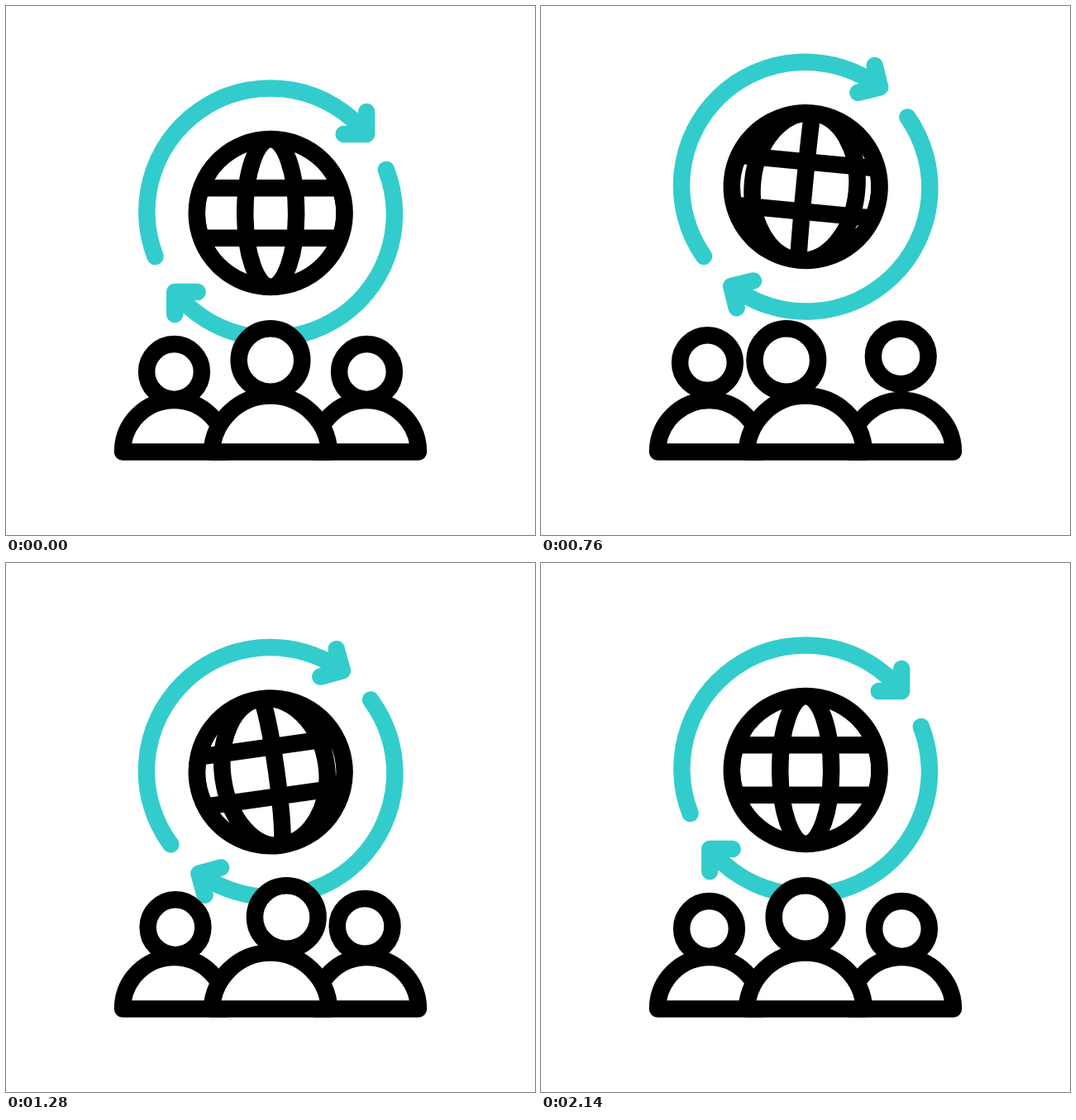
These frames come from a looping animation (640x640 px, 2.4 s). An HTML page:

```html
<!DOCTYPE html>
<html lang="en">
<head>
<meta charset="utf-8">
<title>Global community</title>
<style>
  html, body { margin: 0; width: 100%; height: 100%; overflow: hidden; background: #fff; }
  svg { display: block; width: 100vw; height: 100vh; }
  .line { fill: none; stroke: #000; stroke-width: 20.5; stroke-linecap: round; stroke-linejoin: round; }
  .teal { stroke: #33cccc; }
  .solid { fill: #fff; }
  .flat { stroke-linecap: butt; }
</style>
</head>
<body>
<svg viewBox="0 0 640 640">
  <defs>
    <clipPath id="disc"><circle r="95"/></clipPath>
    <path id="arrow" d="M-139.7 52.5A149.5 149.5 0 0 1 116 -95.5M116 -122.5V-95.5H88.5"/>
  </defs>
  <g id="world">
    <g id="ring" class="line teal">
      <use href="#arrow"/>
      <use href="#arrow" transform="rotate(180)"/>
    </g>
    <g id="globe" class="line">
      <g clip-path="url(#disc)" class="flat">
        <path d="M-90 -30.2H90M-90 30.2H90"/>
        <path id="meridians"/>
      </g>
      <circle r="89.4"/>
    </g>
  </g>
  <g class="line solid">
    <circle id="left" cx="203.5" cy="442.5" r="33.4"/>
    <path d="M141 539.5a62.5 62.5 0 0 1 125 0z"/>
    <circle id="right" cx="436.5" cy="442.5" r="33.4"/>
    <path d="M374 539.5a62.5 62.5 0 0 1 125 0z"/>
    <circle id="middle" cx="320" cy="428.5" r="38.3"/>
    <path d="M248.8 539.5a71.3 71.7 0 0 1 142.4 0z"/>
  </g>
</svg>
<script>
const LOOP = 2400, STEP = 20, LAST = 107, RADIUS = 89.4;

// Each track lists [step, value, ...]; moves between keys ease in and out.
const tracks = {
  height: [[0, 0], [18, 48.6], [36, -35], [53, 47], [73, -30.5], [92, 18], [107, 0]],
  swing: [[0, 0], [23, -39.5], [28, -38.3], [50, 18.5], [70, -24.6], [93, 0]],
  tilt: [[0, 0], [18, -14.6], [48, 12.5], [70, -12.6], [92, 4], [107, 0]],
  left: [[0, 0, 0], [21, -17, -11.7], [27, -17, -11.7], [47, 9, -10.4], [70, 0, 0]],
  right: [[0, 0, 0], [21, 16, -19.3], [27, 16, -19.3], [47, -14, -18], [70, 0, 0]],
  middle: [[2, 0, 0], [35, -24.2, 0], [69, 22, 0], [96, 0, 0]]
};
const spin = [[0, 0], [15, 0.46], [28, 1], [48, 1.95], [64, 2.6], [89, 3.66], [107, 4]];

const $ = id => document.getElementById(id);
const clamp = (v, lo, hi) => Math.min(hi, Math.max(lo, v));
const smooth = p => p * p * (3 - 2 * p);

function ease(keys, n, axis = 1) {
  let i = 0;
  while (i < keys.length - 2 && n >= keys[i + 1][0]) i++;
  const a = keys[i], b = keys[i + 1];
  const p = clamp((n - a[0]) / (b[0] - a[0]), 0, 1);
  return a[axis] + (b[axis] - a[axis]) * smooth(p);
}

// Smooth curve through all keys, at rest on both ends.
function glide(keys, n) {
  let i = 0;
  while (i < keys.length - 2 && n >= keys[i + 1][0]) i++;
  const slope = k => k < 1 || k > keys.length - 2 ? 0
    : (keys[k + 1][1] - keys[k - 1][1]) / (keys[k + 1][0] - keys[k - 1][0]);
  const [x, from] = keys[i], [end, to] = keys[i + 1];
  const span = end - x, p = clamp((n - x) / span, 0, 1), s = smooth(p);
  return from + (to - from) * s
    + span * p * (1 - p) * ((1 - p) * slope(i) - p * slope(i + 1));
}

function meridians(n) {
  const turn = glide(spin, n) % 1;
  const rest = 1 - smooth(clamp(Math.min(n, LAST - n) / 8, 0, 1));
  let d = "";
  for (let i = -2; i <= 2; i++) {
    let lon = -22.5 + 45 * (i + turn);
    if (Math.abs(lon) > 90) continue;
    // The still globe has its outer meridians hidden in the rim.
    lon *= 1 + rest * (Math.abs(lon) > 45 ? 0.34 : -0.1);
    const x = RADIUS * Math.sin(clamp(lon, -90, 90) * Math.PI / 180);
    const rx = Math.max(Math.abs(x), 0.01);
    d += `M0 ${-RADIUS}A${rx} ${RADIUS} 0 0 ${x > 0 ? 1 : 0} 0 ${RADIUS}`;
  }
  return d;
}

function draw(n) {
  const set = (id, value) => $(id).setAttribute("transform", value);
  set("world", `translate(320.2 ${250.5 + ease(tracks.height, n)})`);
  set("ring", `rotate(${ease(tracks.swing, n)})`);
  set("globe", `rotate(${ease(tracks.tilt, n)})`);
  $("meridians").setAttribute("d", meridians(n));
  for (const id of ["left", "right", "middle"])
    set(id, `translate(${ease(tracks[id], n)} ${ease(tracks[id], n, 2)})`);
}

const start = performance.now();
function tick() {
  const t = (performance.now() - start) % LOOP;
  draw(Math.min(LAST, Math.floor(t / STEP)));
  requestAnimationFrame(tick);
}
tick();
</script>
</body>
</html>
```
